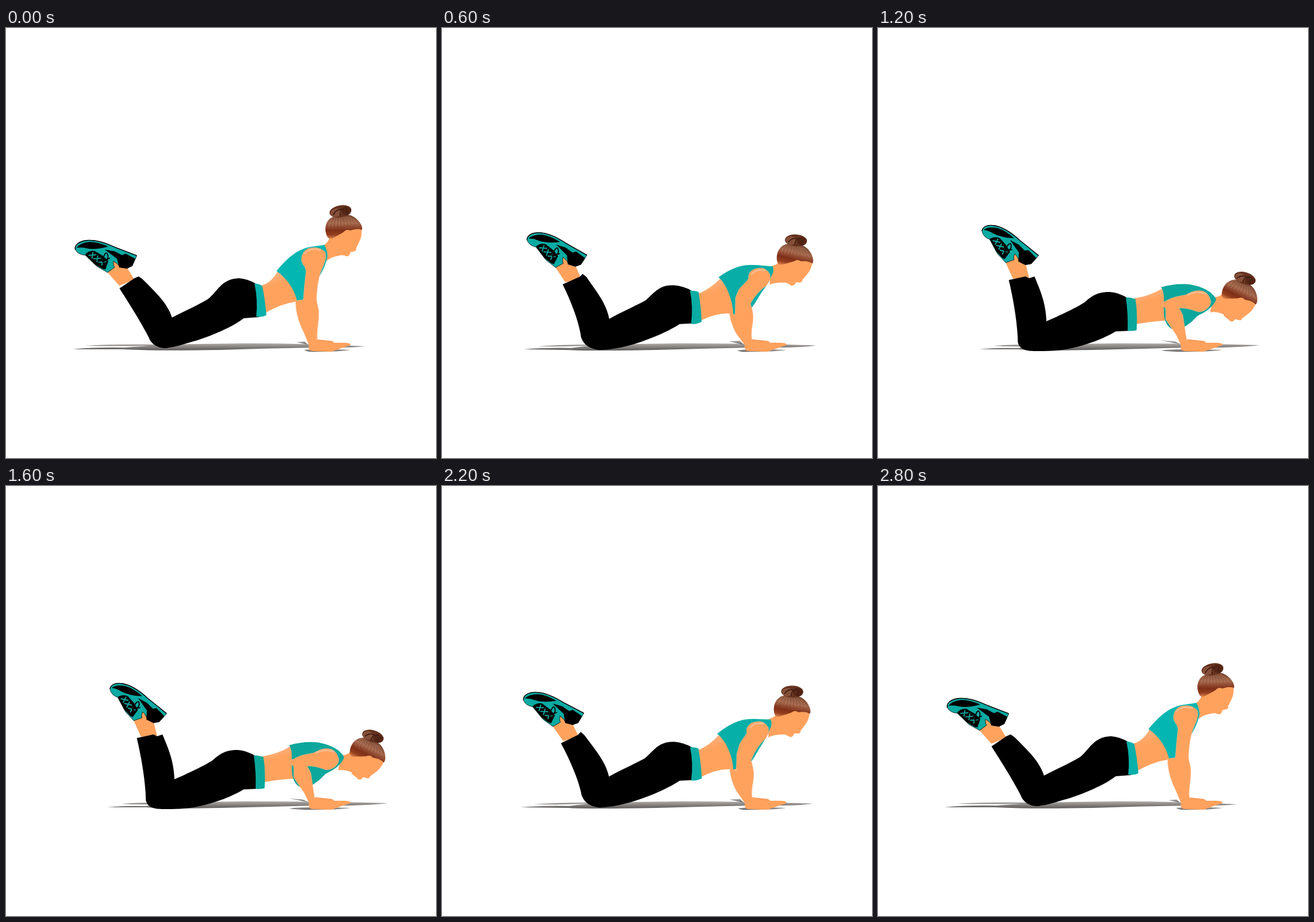
These frames come from a looping animation (720 by 720 pixels, 3000 ms). An HTML page:

```html
<!DOCTYPE html>
<html lang="en">
<head>
<meta charset="utf-8">
<title>Knee push-up</title>
<style>
  html, body { margin: 0; width: 100%; height: 100%; overflow: hidden; background: #fff; }
  svg { display: block; width: 100%; height: 100%; }
</style>
</head>
<body>
<svg viewBox="0 0 720 720">
  <defs>
    <linearGradient id="ground" x1="0" y1="0" x2="0" y2="1">
      <stop offset="0" stop-color="#b0adab"/>
      <stop offset=".5" stop-color="#858280"/>
      <stop offset="1" stop-color="#5c5a59"/>
    </linearGradient>
    <linearGradient id="hair" x1="0" y1="0" x2="0" y2="1">
      <stop offset="0" stop-color="#70402b"/>
      <stop offset=".36" stop-color="#a2664a"/>
      <stop offset=".66" stop-color="#7f2f18"/>
      <stop offset=".84" stop-color="#96401f"/>
      <stop offset="1" stop-color="#e08650"/>
    </linearGradient>
    <linearGradient id="back" x1="0" y1="0" x2=".35" y2="1">
      <stop offset="0" stop-color="#f8bb97"/>
      <stop offset=".4" stop-color="#ffa25d"/>
    </linearGradient>
  </defs>

  <g fill="url(#ground)">
    <path id="shadow"/>
    <path id="handShadow"/>
    <path id="backShadow"/>
  </g>

  <path fill="#f99c5a" d="M518 521L545 524Q553 527 545 530L518 530Z"/>
  <path id="neck" fill="#ffa25d"/>

  <g id="head">
    <path fill="#ffa25d" d="M28-4Q30 10 25 20L19 32Q21 35 16 37L10 38L8 43Q5 47 0 44L-10 42L-26 14L-18-2Z"/>
    <path fill="url(#hair)" d="M-28 14C-35 2-33-12-23-19C-10-27 8-27 18-19C26-13 31-4 29 1C20-2 14 1 9 2Q3-1-2 5C-7 8-13 11-18 14Q-24 18-28 14Z"/>
    <g id="strands" fill="none" stroke="#c8937a" stroke-width="1.5" opacity=".3"/>
    <g transform="rotate(-10 -7 -30)">
      <ellipse cx="-7" cy="-30" rx="18.5" ry="10" fill="#65331f"/>
      <ellipse cx="-15" cy="-29" rx="9" ry="7" fill="#85503a"/>
      <ellipse cx="3" cy="-29" rx="8" ry="7" fill="#552516"/>
      <path fill="none" stroke="#3f1c12" stroke-width="1.6" d="M-20-26Q-13-36-4-32M-9-23Q-8-34 2-35M4-23Q0-30 6-32"/>
    </g>
  </g>

  <path id="torso" fill="url(#back)"/>
  <path id="top"/>
  <path id="thigh"/>
  <path id="band"/>

  <g id="foot"><g transform="translate(-174 -340)">
    <path fill="#ffa25d" d="M213 391L222 374L234 378L237 388L247 394L253 418L226 420Z"/>
    <path fill="#0aaba3" stroke="#000" stroke-width=".7" d="M174 340C175 332 184 329 196 331C212 334 226 345 238 356L269 381L262 389L256 395Q245 396 237 391L233 383L229 378Q226 385 228 388L214 393L200 378L187 354Q176 350 174 340Z"/>
    <path fill="none" stroke="#000" stroke-width="1.3" d="M174 340C175 332 184 329 196 331C212 334 226 345 238 356L269 381"/>
    <path d="M177 338Q184 332 200 335Q214 339 228 352Q206 351 193 344Q185 339 177 338Z"/>
    <path d="M221 355L236 363L250 377L236 376Z"/>
    <path d="M236 374L252 372L265 385L257 395L247 397L235 391Z"/>
    <path d="M187 353Q196 348 204 352L215 364L221 375L212 387L208 385L198 374Z"/>
    <g id="laces" stroke="#0aaba3" stroke-width="1.8"/>
    <path fill="none" stroke="#000" stroke-width="1.7" d="M211 373Q222 355 223 364T211 374L225 371"/>
  </g></g>

  <path id="shin"/>
  <path id="arm" fill="#ffa25d" stroke="#ffb688" stroke-width=".7"/>
  <path id="shine" fill="none" stroke="#f8c8ab" stroke-width="2.5" stroke-linecap="round" opacity=".7"/>
  <path fill="#ffa25d" d="M508 529Q504 538 512 541L545 542Q556 538 577 531Q578 527 565 527L540 527L518 522Z"/>
</svg>

<script>
const $ = id => document.getElementById(id);

// Each part: attribute, then its value in the high, middle and low pose.
const parts = {
  shadow: ['d',
    'M111 538Q150 534 199 535L240 532Q180 533 132 532Q180 529 250 530L400 528Q500 528 602 533Q570 536 520 535Q440 536 360 539Q250 541 195 538Z',
    'M151 538Q185 535 225 536L250 532Q205 534 174 533Q210 530 260 530L400 528Q520 528 634 531Q605 536 520 535Q440 537 360 539Q250 541 225 539Z',
    'M169 538Q200 535 235 536L250 533Q220 534 193 532Q220 530 260 530L400 528Q530 528 639 531Q605 536 520 535Q440 537 360 539Q270 541 235 538Z'],
  handShadow: ['d',
    'M499 539Q520 536 576 539Q560 542 520 542Q505 543 499 539Z',
    'M487 540Q510 536 576 539Q560 542 515 542Q497 543 487 540Z',
    'M474 540Q500 536 576 539Q560 542 510 542Q490 542 474 540Z'],
  backShadow: ['d',
    'M486 526L500 525L505 530Z',
    'M477 524L498 524L505 530Z',
    'M473 523L497 525L505 529Z'],
  neck: ['d',
    'M541 345Q544 357 530 365L537 390Q545 382 566 380L575 355Z',
    'M573 412Q570 419 556 420L553 450Q565 446 587 452L600 425Z',
    'M580 440Q576 450 562 451L556 476Q572 473 590 486L605 455Z'],
  head: ['transform',
    'translate(567 337) rotate(0)',
    'translate(601 413) rotate(20)',
    'translate(607 449) rotate(27)'],
  torso: ['d',
    'M428 431Q444 427 455 407L480 415L500 440L498 455L486 458Q460 462 434 477Z',
    'M428 450Q452 442 470 427L490 435L500 470L490 490L481 485Q460 483 432 494Z',
    'M428 453Q455 449 476 436L500 440L510 470L495 491L481 490Q460 491 431 496Z'],
  top: ['d',
    'M453 407C465 392 480 376 500 369C512 365 525 365 533 363C537 370 539 378 538 384C535 398 530 406 527 412L510 440L498 455L487 456C484 440 470 418 453 407Z',
    'M468 424C483 416 498 411 515 411C530 411 545 415 558 418C561 422 561 428 558 432C552 446 543 453 536 460L527 473L516 486L489 491C483 478 484 440 468 424Z',
    'M474 434C488 430 502 428 518 429C532 430 548 436 557 443C562 448 566 452 566 455C560 470 545 477 535 482L525 492L511 502L492 504C468 490 486 450 474 434Z'],
  thigh: ['d',
    'M272 488C290 478 318 466 338 454C354 442 360 420 390 419Q405 420 420 429L424 484L398 486C380 500 350 513 320 523C300 528 285 535 265 536L250 520Z',
    'M275 492C292 482 320 470 342 458C356 446 364 435 388 436Q404 437 419 446L421 500L398 501C380 512 350 525 320 533C300 538 285 540 260 540L250 520Z',
    'M276 494C293 486 322 474 345 460C358 449 366 442 388 442Q404 443 419 453L422 507L398 508C380 519 350 531 320 537C300 541 285 541 260 541L250 520Z'],
  band: ['d',
    'M416 428Q424 428 429 432Q434 455 436 481Q428 485 419 483Q422 455 416 428Z',
    'M415 445Q424 445 430 447Q434 470 434 498Q426 502 417 501Q420 472 415 445Z',
    'M415 451Q424 451 431 454Q435 478 433 506Q426 508 418 507Q419 480 415 451Z'],
  foot: ['transform',
    'translate(116 371) rotate(-17.7)',
    'translate(156 348) rotate(-5.1)',
    'translate(174 340) rotate(0)'],
  shin: ['d',
    'M190 436L215 419L222 416L228 420C248 440 270 460 278 485L290 515L270 536C256 537 243 530 239 518C230 500 215 475 190 436Z',
    'M209 426L238 416L243 413L250 416C262 438 278 460 281 489L290 518L265 540C246 540 235 532 232 518C231 495 222 460 209 426Z',
    'M219 422L247 416L253 419L262 416C270 436 281 458 282 491L290 518L262 541C240 541 233 532 234 520C233 495 228 460 219 422Z'],
  arm: ['d',
    'M513 368C500 368 494 380 495 390C497 398 504 400 502 412L500 430L498 455L485 457C485 480 494 500 498 508L508 532L522 530C518 505 526 490 523 470Q519 455 520 450C521 430 524 415 529 403C536 390 537 378 533 374C527 369 520 367 513 368Z',
    'M537 419C524 419 518 426 517 433C508 440 496 445 492 450L485 458L487 482L481 484C484 495 489 505 494 513L508 532L519 530C514 505 519 495 517 480Q515 470 512 466C520 460 530 455 538 453C550 449 555 440 554 432C550 422 545 419 537 419Z',
    'M540 440C528 439 522 444 515 447C505 449 495 450 486 455L474 461L482 470L482 488C488 497 493 505 499 513L508 532L518 530C514 507 512 490 510 480Q507 474 504 469C515 468 527 472 535 475C548 476 558 466 557 457C554 446 549 441 540 440Z'],
  shine: ['d',
    'M500 377Q511 367 526 372',
    'M522 428Q532 419 546 423',
    'M519 447Q533 439 549 445']
};

const teal = ['rgb(4,182,178)', 'rgb(10,170,162)', 'rgb(12,167,156)'];
const bandTeal = ['rgb(8,176,170)', 'rgb(12,170,160)', 'rgb(12,167,156)'];

// Shadow's left end at every step; it measures how far the body is lowered.
const reach = [111, 115, 125, 137, 151, 162, 170, 172, 170, 159, 145, 131, 119, 115, 111];
const keys = [111, 151, 170];
const STEP = 200;

// Quadratic weights of the three poses.
const weights = x => keys.map((k, i) =>
  keys.reduce((w, other, j) => i === j ? w : w * (x - other) / (k - other), 1));

const numbers = /-?\d+(\.\d+)?/g;

function blend(poses, w) {
  const [, mid, low] = poses.map(p => p.match(numbers));
  let i = 0;
  return poses[0].replace(numbers, n => {
    const v = n * w[0] + mid[i] * w[1] + low[i] * w[2];
    i++;
    return v.toFixed(2);
  });
}

function line(parent, d) {
  const p = document.createElementNS('http://www.w3.org/2000/svg', 'path');
  p.setAttribute('d', d);
  parent.append(p);
}

for (let i = 0; i < 9; i++) {
  const x = -25 + i * 5.5;
  line($('strands'), `M${x * 0.6 - 4} -21Q${x} -14 ${x * 1.05} ${-4 - i * 0.5}`);
}
for (let i = 0; i < 3; i++) {
  const x = 192 + i * 6, y = 356 + i * 8;
  line($('laces'), `M${x} ${y}L${x + 13} ${y + 3}M${x + 4} ${y + 7}L${x + 9} ${y - 3}`);
}

function draw(t) {
  const w = weights(reach[Math.floor(t / STEP) % reach.length]);
  for (const id in parts) {
    const [attr, ...poses] = parts[id];
    $(id).setAttribute(attr, blend(poses, w));
  }
  $('top').setAttribute('fill', blend(teal, w));
  $('band').setAttribute('fill', blend(bandTeal, w));
}

const start = performance.now();
function tick() {
  draw(performance.now() - start);
  requestAnimationFrame(tick);
}
tick();
</script>
</body>
</html>
```
